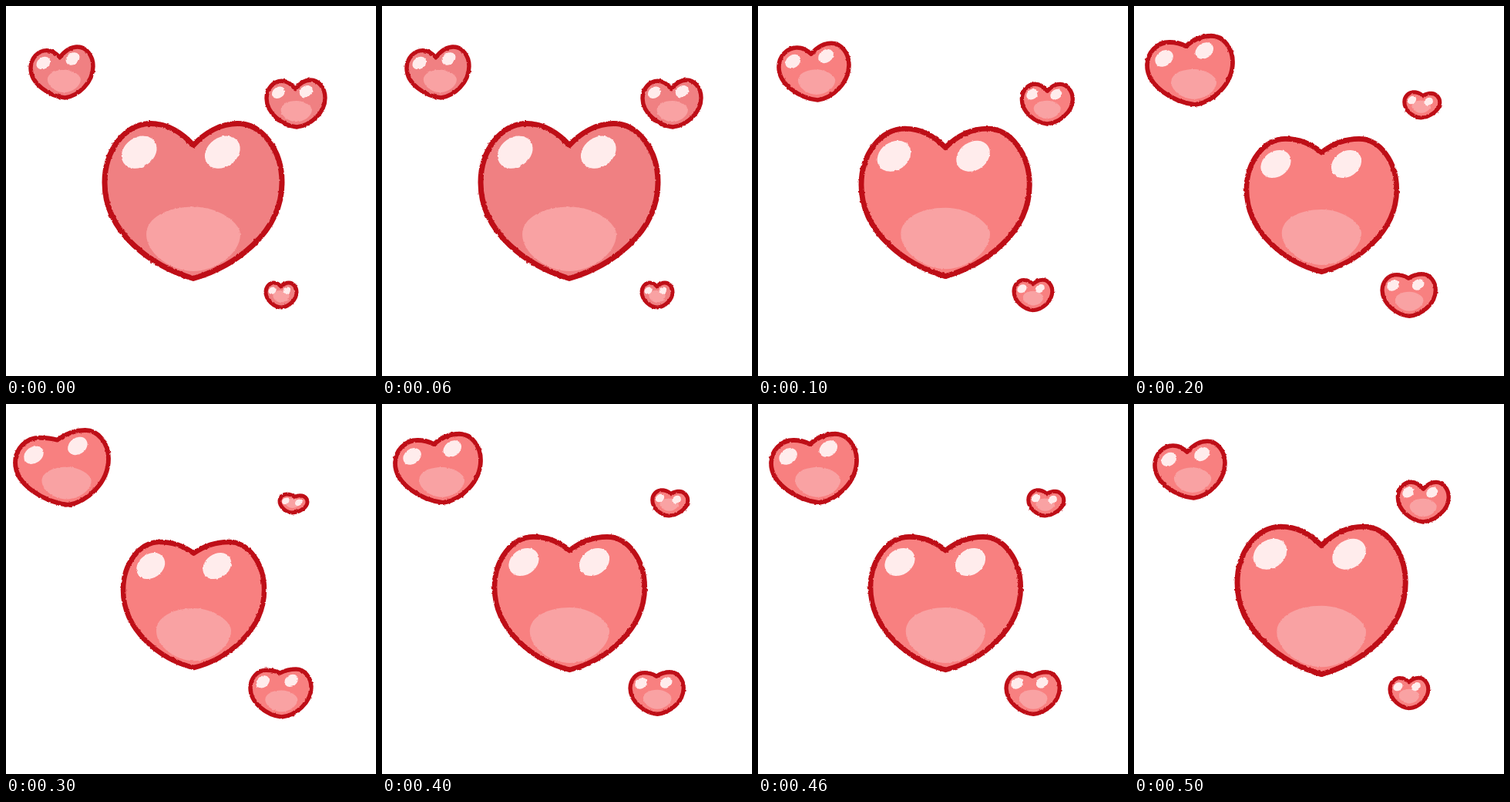
An HTML page for the animation above (600 ms loop, 480x480 px).

```html
<!DOCTYPE html>
<html lang="en">
<head>
<meta charset="utf-8">
<title>Pulsing hearts</title>
<style>
  html, body { margin: 0; width: 100%; height: 100%; overflow: hidden; background: #fff; }
  svg { display: block; width: 100%; height: 100%; }
  .pose { opacity: 0; animation: 600ms step-end infinite; }
  .rest { animation-name: rest; --body: #f08082; }
  .ease { animation-name: ease; }
  .near { animation-name: near; }
  .peak { animation-name: peak; }
  .body { fill: var(--body, #f88080); stroke: #be0e17; stroke-linejoin: round; }
  .shade { fill: #f9a2a3; }
  .glint { fill: #ffecec; }
  @keyframes rest { 0% { opacity: 1 } 16.6667%, 100% { opacity: 0 } }
  @keyframes ease { 0% { opacity: 0 } 16.6667% { opacity: 1 } 33.3333% { opacity: 0 } 83.3333%, 100% { opacity: 1 } }
  @keyframes near { 0% { opacity: 0 } 33.3333% { opacity: 1 } 50% { opacity: 0 } 66.6667% { opacity: 1 } 83.3333%, 100% { opacity: 0 } }
  @keyframes peak { 0% { opacity: 0 } 50% { opacity: 1 } 66.6667%, 100% { opacity: 0 } }
</style>
</head>
<body>
<svg id="stage" viewBox="0 0 480 480"></svg>
<script>
// Both ends of each heart's swing; dip is the notch depth, lean drops one lobe
const hearts = [
  { from: { x: 243, y: 253, w: 230, h: 201, dip: .14, lean: 0 },
    to: { x: 243.5, y: 260.5, w: 183, h: 163, dip: .09, lean: 0 } },
  { from: { x: 72.5, y: 86, w: 81, h: 66, dip: .21, lean: .07 },
    to: { x: 72.5, y: 82.5, w: 121, h: 97, dip: .13, lean: .1 } },
  { from: { x: 376, y: 126.5, w: 76, h: 61, dip: .19, lean: .02 },
    to: { x: 373, y: 129, w: 36, h: 24, dip: .13, lean: -.07 } },
  { from: { x: 357, y: 375, w: 40, h: 32, dip: .16, lean: 0 },
    to: { x: 356.5, y: 375, w: 79, h: 62, dip: .08, lean: .02 } }
];

const mix = (a, b, t) => a + (b - a) * t;

const blend = (a, b, t) =>
  Object.fromEntries(Object.keys(a).map(k => [k, mix(a[k], b[k], t)]));

// Half outline from notch to tip
function half([nx, ny], [lx, ly], [sx, sy], [tx, ty], point) {
  return [
    [nx, ny],
    [mix(nx, lx, .25), mix(ny, ly, .55)], [mix(lx, nx, .4), ly], [lx, ly],
    [mix(lx, sx, .55), ly], [sx, mix(sy, ly, .55)], [sx, sy],
    [sx, mix(sy, ty, .53)], [mix(tx, sx, .46), mix(ty, sy, point)], [tx, ty]
  ];
}

// Dome with a slightly pointed base
function shadePath(x, cy, rx, ry) {
  const y = cy - ry * .15, top = cy - ry, base = cy + ry, bend = mix(y, base, .55);
  return `M${x - rx},${y}C${x - rx},${mix(y, top, .6)} ${x - rx * .55},${top} ${x},${top}` +
    `S${x + rx},${mix(y, top, .4)} ${x + rx},${y}` +
    `C${x + rx},${bend} ${x + rx * .45},${base} ${x},${base}` +
    `S${x - rx},${bend} ${x - rx},${y}Z`;
}

function heart({ x, y, w, h, dip, lean }) {
  const at = (u, v) => [x + (u - .5) * w, y + (v - .5) * h];
  const dropL = Math.max(0, lean), dropR = Math.max(0, -lean);
  const notch = at(.5 - lean / 2, dip), tip = at(.5 + lean * .7, 1);
  const point = .01 + .0005 * w;
  const left = half(notch, at(.26, dropL), at(0, .38 + dropL / 2), tip, point);
  const right = half(notch, at(.75, dropR), at(1, .38 + dropR / 2), tip, point).reverse();
  const outline = `M${left[0]}C${[...left.slice(1), ...right.slice(1)].join(' ')}Z`;

  const r = 1.5 + .1 * w;
  const glint = (u, drop) => {
    const [gx, gy] = at(u, .16 + drop * 1.2);
    return `<ellipse class="glint" rx="${r}" ry="${r * .78}" transform="translate(${gx + 1} ${gy + 5}) rotate(-35)"/>`;
  };
  const [sx, sy] = at(.5 + lean / 2, .78);

  return `<path class="body" stroke-width="${4.6 + .0105 * w}" d="${outline}"/>` +
    `<path class="shade" d="${shadePath(sx, sy - 7, .265 * w, 1.5 + .2 * h)}"/>` +
    glint(.19, dropL) + glint(.66, dropR);
}

// Rough crayon edge
const rough = (id, seed) =>
  `<filter id="${id}" filterUnits="userSpaceOnUse" x="0" y="0" width="480" height="480" color-interpolation-filters="sRGB">
    <feTurbulence type="fractalNoise" baseFrequency=".25" numOctaves="2" seed="${seed}"/>
    <feDisplacementMap in="SourceGraphic" scale="2.5" xChannelSelector="R" yChannelSelector="G"/>
  </filter>`;

// Four poses, evenly spaced in phase along a cosine swing
document.getElementById('stage').innerHTML = ['rest', 'ease', 'near', 'peak'].map((name, i) => {
  const swing = (1 - Math.cos(i * Math.PI / 3)) / 2;
  const shapes = hearts.map(({ from, to }) => heart(blend(from, to, swing))).join('');
  return rough('rough-' + name, i + 3) +
    `<g class="pose ${name}"><g filter="url(#rough-${name})">${shapes}</g></g>`;
}).join('');
</script>
</body>
</html>
```
